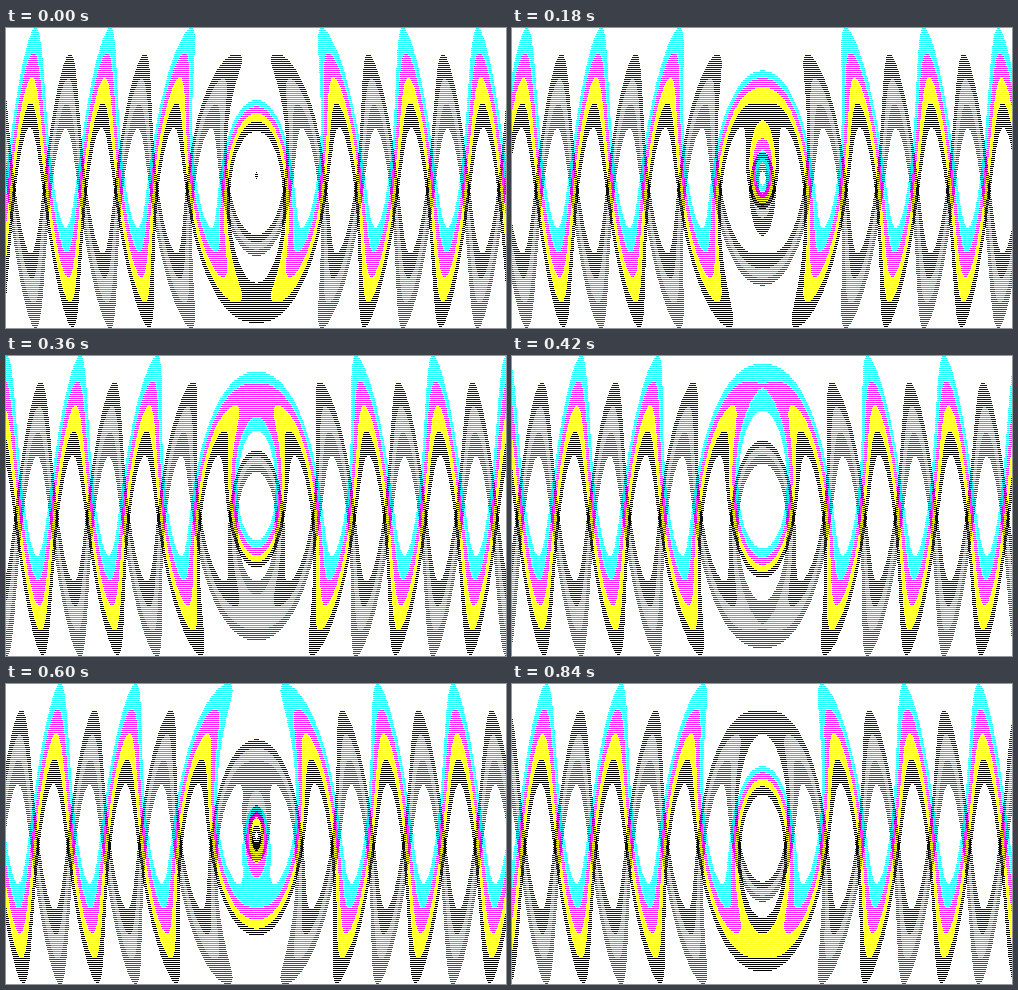
Recreate the animation shown at these times as an HTML page with a canvas. Size 500 by 300 pixels, loop 0.9 s.

```html
<!DOCTYPE html>
<html>
<head>
<meta charset="utf-8">
<style>
  html, body { margin: 0; width: 100%; height: 100%; overflow: hidden; background: #fff; }
  canvas { display: block; }
</style>
</head>
<body>
<canvas id="stage" width="500" height="300"></canvas>
<script>
const W = 500, H = 300, LOOP = 900, STEP = 60, BAND = 25;
const ctx = document.getElementById('stage').getContext('2d');
const image = ctx.createImageData(W, H);
const pixels = new Uint32Array(image.data.buffer);

// Colours as 0xAABBGGRR
const WHITE = 0xffffffff;
const CMYK = [0xffffff20, 0xffff20ff, 0xff20ffff, 0xff000000];
const WBGR = [WHITE, 0xffff0000, 0xff00ff00, 0xff0000ff];

// Two opposite ripples share the picture: one on even rows, one on odd rows.
function draw(time) {
  const turn = time / LOOP + 0.183;
  for (let row = 0; row < H; row++) {
    const even = row % 2 === 0;
    const bands = even ? CMYK : WBGR;
    const height = even ? -100 : 100;
    const y = even ? row + 1 : row; // middle of the row pair
    for (let x = 0; x < W; x++) {
      const radius = Math.hypot((x - W / 2) * 7 / W, (y - H / 2) * 1.5 / H);
      const top = 100 + height * Math.cos(2 * Math.PI * (radius - turn));
      pixels[row * W + x] = bands[Math.floor((y - top) / BAND)] ?? WHITE;
    }
  }
  ctx.putImageData(image, 0, 0);
}

let shown = -1;
function tick() {
  const time = Math.floor(performance.now() % LOOP / STEP) * STEP;
  if (time !== shown) draw(shown = time);
  requestAnimationFrame(tick);
}
tick();
</script>
</body>
</html>
```
